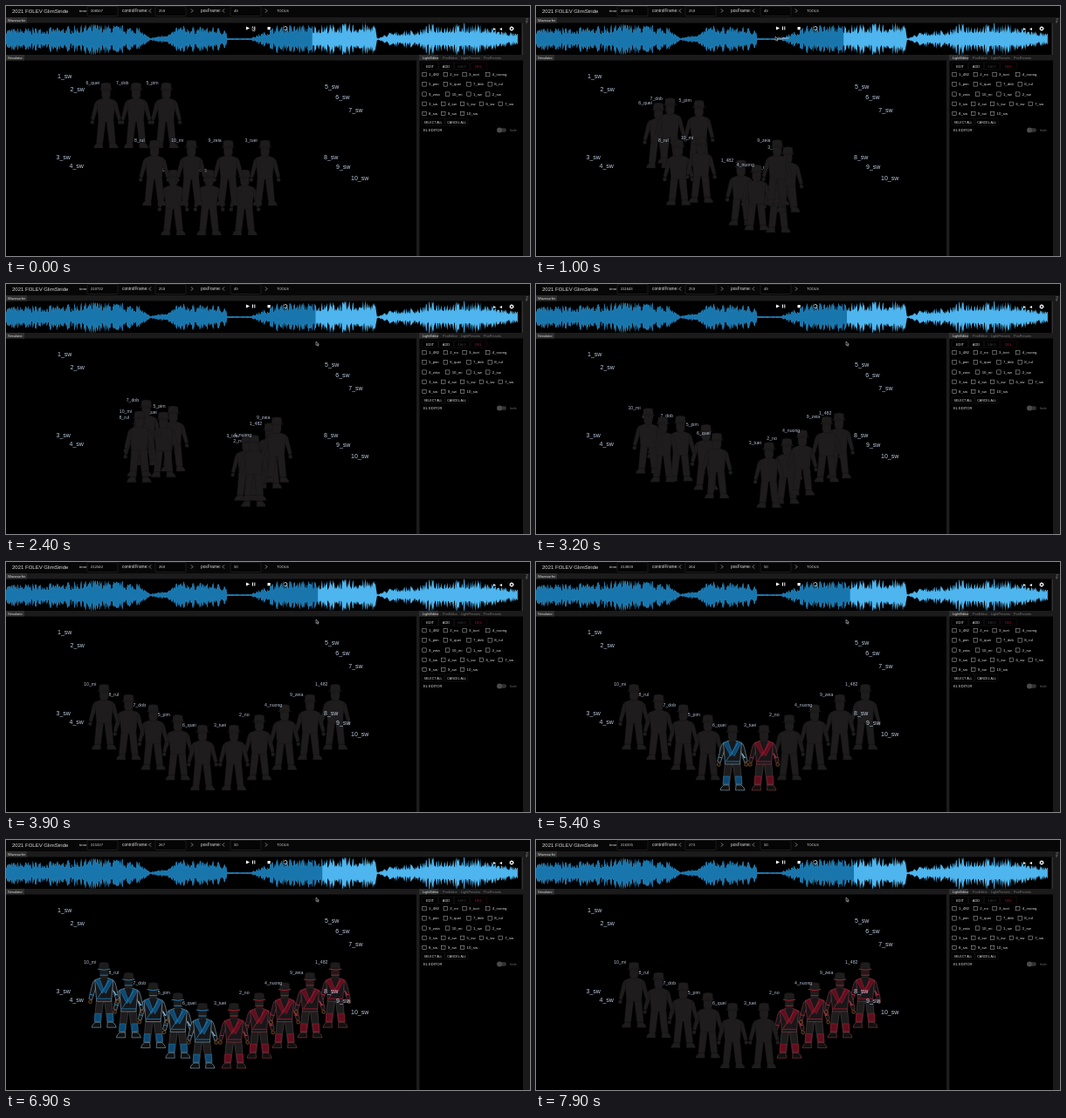
Animation, 600 px wide and 287 px high, one loop 8000 ms. Source, as an HTML page:

```html
<!DOCTYPE html>
<html lang="en">
<head>
<meta charset="utf-8">
<title>Light show editor</title>
<style>
  html, body { margin: 0; width: 100%; height: 100%; overflow: hidden; background: #000; }
  svg { display: block; width: 100%; height: 100%; font-family: "Liberation Sans", Arial, sans-serif; }
  text { white-space: pre; }
  .blue { --c: #1f86c6; --edge: #9fc6da; --dark: #10486f; }
  .red { --c: #ae1d33; --edge: #a5404f; --dark: #5e0f1e; }
</style>
</head>
<body>
<svg id="stage" viewBox="0 0 600 287" preserveAspectRatio="none"></svg>
<script>
const LOOP = 8000, STEP = 100;
const MOVE_START = 208507, MOVE_END = 212250;
const BODY = '#1e1c1c';
const stage = document.getElementById('stage');

const names = ['1_482', '2_no', '3_tuei', '4_nuong', '5_pim', '6_quei', '7_dob', '8_rul', '9_zeia', '10_mi'];
// dancers by number: three starting rows, then one V from left to right
const startRows = [
  { who: [6, 7, 5], x: 114.5, y: 88, gap: 34.5 },
  { who: [8, 10, 9, 3], x: 170, y: 154, gap: 42.2 },
  { who: [1, 4, 2], x: 191.5, y: 188, gap: 41 }
];
const lineUp = [10, 8, 7, 5, 6, 3, 2, 4, 9, 1];

// loop time, show time
const clock = [[0, 208507], [1000, 209379], [2400, 210732], [3200, 211643], [LOOP, 216435]];
const pointer = [[0, 282, 24], [400, 282, 24], [900, 274, 35], [1300, 274, 35], [1900, 355, 66]];

const mix = (a, b, u) => a + (b - a) * u;
const clamp = (v, low, high) => Math.max(low, Math.min(high, v));

function along(points, t) {
  const next = points.findIndex(p => p[0] > t);
  if (next < 0) return points.at(-1).slice(1);
  const a = points[next - 1], b = points[next];
  return a.slice(1).map((v, k) => mix(v, b[k + 1], (t - a[0]) / (b[0] - a[0])));
}

const label = (x, y, text, size = 4.4, fill = '#ddd', extra = '') =>
  `<text x="${x}" y="${y}" font-size="${size}" fill="${fill}" ${extra}>${text}</text>`;
const box = (x, y, w, h, fill, stroke = 'none', r = 0) =>
  `<rect x="${x}" y="${y}" width="${w}" height="${h}" rx="${r}" fill="${fill}" stroke="${stroke}" stroke-width=".5"/>`;
const shape = (d, fill, stroke = 'none', width = .5) =>
  `<path d="${d}" fill="${fill}" stroke="${stroke}" stroke-width="${width}"/>`;
const line = (d, color, width = .6) => shape(d, 'none', color, width);
const both = part => part + `<g transform="scale(-1 1)">${part}</g>`;
const strip = (x, y, w, tab) => box(x, y, w, 6.5, '#1b1b1b') + box(x, y, tab, 6.5, '#303030');

function wavePath() {
  const envelope = [[0, 12], [60, 13], [100, 17], [150, 14], [165, 1], [192, 8], [195, 15], [252, 12], [253, .8],
    [280, 1], [310, 15], [422, 18], [425, 1], [440, 8], [475, 11], [485, 17], [540, 17], [586, 6]];
  let seed = 7;
  const random = () => (seed = seed * 16807 % 2147483647) / 2147483647;
  const top = [], bottom = [];
  for (let x = 0; x <= 586; x += .7) {
    const [level] = along(envelope, Math.min(x, 585.9));
    const spike = level * (.4 + .7 * random() ** 1.6);
    top.push(`${x.toFixed(1)} ${(38 - spike).toFixed(1)}`);
    bottom.unshift(`${x.toFixed(1)} ${(38 + spike * mix(.85, 1.1, random())).toFixed(1)}`);
  }
  return `M${top.join('L')}L${bottom.join('L')}Z`;
}

const outline = {
  hat: 'M-6 8L-5.3 1Q0-1 5.3 1L6 8Z',
  brim: 'M-8 8Q0 6 8 8Q0 10.500 -8 8Z',
  head: 'M-5 8.500H5V15Q4 18 2.500 19H-2.500Q-4 18 -5 15Z',
  torso: 'M-4 18L-10.500 20.500L-8.500 45H8.500L10.500 20.500L4 18Z',
  arm: 'M-9.500 20.500Q-12.500 21 -13.500 26L-17.300 42L-13.800 43.500L-9.500 30Z',
  leg: 'M-8.800 44H-.4L-3.500 69H-11Z',
  foot: 'M-10 69H-4L-3.500 75H-14Q-14 72 -10 69Z'
};

function dimFigure() {
  const part = name => shape(outline[name], BODY, '#171516', .3);
  return both(part('arm') + part('leg') + part('foot') + `<circle cx="-15.700" cy="45.500" r="2.200" fill="${BODY}"/>`) +
    ['torso', 'head', 'hat', 'brim'].map(part).join('');
}

function litFigure() {
  const side = shape(outline.arm, '#151517', 'var(--edge)') +
    shape(outline.leg, BODY, '#626064', .4) +
    shape('M-10.300 59H-3.500L-4 68H-10.800Z', 'var(--dark)', 'var(--c)') +
    shape(outline.foot, '#111', 'var(--edge)') +
    line('M-16 37L-11.500 38', 'var(--c)', 1) +
    '<circle cx="-15.700" cy="45.500" r="1.900" fill="#150f0a" stroke="#a4692d" stroke-width=".6"/>';
  const lapel = shape('M-10 21L-5 19L0 33L-2 36Z', 'var(--dark)', 'var(--c)');
  return both(side) + shape(outline.torso, '#171719', 'var(--edge)') + both(lapel) +
    line('M-8.500 42H8.500M6 21L-7 41', 'var(--c)', .8) + line('M11 33L14 38', 'var(--edge)', 1.1) +
    ['head', 'hat', 'brim'].map(name => shape(outline[name], BODY, '#171516', .3)).join('') +
    `<g class="band">${line('M-7 8Q0 10 7 8M-4.500 15H4.500', 'var(--c)', .9)}</g>`;
}

function topBar() {
  const chevron = (x, dir) => line(`M${x} 3.500L${x + 2 * dir} 5.500L${x} 7.500`, '#ddd');
  const field = (x, id) => box(x, .3, 35, 11.200, '#050505', '#333', 1) + label(x + 4, 7.200, '', 4.200, '#ddd', `id="${id}"`);
  return box(0, 0, 600, 13.500, '#070707') + label(7, 8, '2021 FOLEV GlimStride', 6) +
    label(84, 7.200, 'time:') + field(93, 'time') +
    label(133, 7.200, 'controlFrame:', 4.800) + chevron(166, -1) + field(171, 'control') + chevron(212, 1) +
    label(223, 7.200, 'posFrame:', 4.800) + chevron(250, -1) + field(257, 'position') + chevron(297, 1) +
    label(310, 7.200, 'TOOLS', 4.100);
}

function wavePanel() {
  const wave = wavePath();
  const ring = (x, y, r, dash, width = .7) =>
    `<circle cx="${x}" cy="${y}" r="${r}" fill="none" stroke="#fff" stroke-width="${width}" stroke-dasharray="${dash}"/>`;
  return strip(0, 13, 592, 24) + label(2, 17.500, 'Wavesurfer', 4) + shape(wave, '#4eb5ee') +
    '<clipPath id="playedClip"><rect id="played" y="19" height="38"/></clipPath>' +
    `<g clip-path="url(#playedClip)">${shape(wave, '#1976ad')}</g>` +
    shape('M275 23.500L279 25.500L275 27.500ZM282 23.500h1v4h-1zM284.300 23.500h1v4h-1zM299.500 24h3.200v3.200h-3.200z' +
      'M558 25L561 26.500L558 28ZM568 25L565 26.500L568 28Z', '#fff') +
    ring(320, 25.500, 2, '4.800 1.500') + ring(579, 26, 1.600, 'none', 1.100) + ring(579, 26, 2.400, '1 .880') +
    box(590.500, 19.500, 1.500, 36.500, '#333');
}

function editorPanel() {
  const items = [...names, ...Array.from({ length: 10 }, (_, i) => `${i + 1}_sw`)];
  const checkRow = (from, to, y) => {
    let x = 479;
    return items.slice(from, to).map(name => {
      const cell = box(x - 2.200, y - 2.200, 4.400, 4.400, 'none', '#bbb') + label(x + 5, y + 1.500, name, 4.300);
      x += 12 + 2.450 * name.length;
      return cell;
    }).join('');
  };
  const checks = [0, 4, 8, 12, 17, 20].map((from, row, starts) =>
    row < 5 ? checkRow(from, starts[row + 1], 78.700 + row * 11.200) : '').join('');
  const button = (x, y, w, text, size, color = '#ddd', border = '#1c1c1c') =>
    box(x, y, w, 8, 'none', border, 1) + label(x + w / 2, y + 5.600, text, size, color, 'text-anchor="middle"');
  return box(470, 56, 3.500, 231, '#1c1c1c') + strip(473, 56, 119, 22) +
    label(477, 60.500, 'LightEditor', 3.900) + label(500, 60.500, 'PosEditor', 3.900, '#777') +
    label(521, 60.500, 'LightPresets', 3.900, '#777') + label(547, 60.500, 'PosPresets', 3.900, '#777') +
    button(476, 65, 19, 'EDIT', 4) + button(495, 65, 18, 'ADD', 4) + button(513, 65, 18, 'SAVE', 4, '#333') +
    button(532, 65, 18.500, 'DEL', 4, '#a81430', '#2c0a12') + checks +
    button(476, 129, 26, 'SELECT ALL', 3.600) + button(503, 129, 26, 'CANCEL ALL', 3.600) +
    label(478, 144, 'EL EDITOR', 4.100) + box(563, 140.200, 10, 4.500, '#333', 'none', 2.200) +
    '<circle cx="565" cy="142.400" r="3" fill="#4b4b4b"/>' + label(577, 144, 'hide', 4.200, '#666') +
    box(592, 13, 8, 274, '#1a1a1a') + label(0, 0, 'File', 3.600, '#888', 'transform="translate(595 14) rotate(90)"');
}

function sideLabels() {
  const groups = [
    { first: 1, count: 2, x: 59, y: 83, dx: 14.5, dy: 14.5 },
    { first: 3, count: 2, x: 57.5, y: 176, dx: 15, dy: 10 },
    { first: 5, count: 3, x: 365, y: 95, dx: 12.3, dy: 12.3 },
    { first: 8, count: 3, x: 364, y: 176, dx: 14, dy: 10.8 }
  ];
  return groups.map(g => Array.from({ length: g.count }, (_, k) =>
    label(g.x + g.dx * k ** 1.15, g.y + g.dy * k ** 1.15, `${g.first + k}_sw`, 7, '#bccbe0')).join('')).join('');
}

const dancers = names.map((name, i) => {
  const number = i + 1;
  const row = startRows.find(r => r.who.includes(number));
  const place = lineUp.indexOf(number);
  const left = place < 5;
  const fromCentre = left ? 4 - place : place - 5;
  return {
    name, place, left, fromCentre,
    x0: row.x + row.gap * row.who.indexOf(number), y0: row.y,
    x1: left ? 225 - 28.2 * fromCentre : 261 + 29 * fromCentre, y1: 187 - 11.7 * fromCentre
  };
});

function simulator() {
  return strip(0, 56, 470, 21) + label(2, 60.500, 'Simulator', 4) +
    dancers.map(d => `<g class="dancer ${d.left ? 'blue' : 'red'}"><g>${dimFigure()}</g><g>${litFigure()}</g>` +
      `${label(-23, 2, d.name, 5.200, '#b4bfd2')}</g>`).join('') + sideLabels();
}

stage.innerHTML = box(0, 0, 600, 287, '#000') + topBar() + wavePanel() + simulator() + editorPanel() +
  label(275.500, 38, 'play/pause', 3, '#ddd', 'id="tip"') +
  '<path id="pointer" d="M0 0V4.500L1.100 3.600L1.900 5.300L2.700 4.900L1.900 3.300H3.300Z" fill="#111" stroke="#ddd" stroke-width=".5"/>';

const el = id => document.getElementById(id);
const figures = [...document.querySelectorAll('.dancer')];
const show = (node, on) => node.setAttribute('display', on ? 'inline' : 'none');

// lights build up to cue 267, then a faster run switches them off
function cueAt(time) {
  const build = clamp(Math.floor((time - 212300) / 360), -1, 7);
  const fade = Math.max(0, Math.floor((time - 215300) / 155));
  return 260 + build + fade;
}

// the pair in the centre starts, its neighbours follow, then all go dark from the left
function isLit(dancer, cue) {
  const reach = cue < 262 ? 0 : cue < 265 ? 1 : cue < 267 ? cue - 263 : 5;
  return dancer.fromCentre < reach && dancer.place >= cue - 267;
}

function draw() {
  const t = Math.floor(performance.now() % LOOP / STEP) * STEP;
  const [time] = along(clock, t);
  const cue = cueAt(time);
  const u = clamp((time - MOVE_START) / (MOVE_END - MOVE_START), 0, 1);

  el('time').textContent = Math.round(time);
  el('control').textContent = cue;
  el('position').textContent = u < 1 ? 49 : 50;
  el('played').setAttribute('width', time * .001682);

  figures.forEach((figure, i) => {
    const d = dancers[i];
    const [dim, lit] = figure.children;
    const on = isLit(d, cue);
    figure.setAttribute('transform', `translate(${mix(d.x0, d.x1, u)} ${mix(d.y0, d.y1, u)})`);
    show(dim, !on);
    show(lit, on);
    show(lit.querySelector('.band'), on && cue > 264);
  });

  const [px, py] = along(pointer, t);
  el('pointer').setAttribute('transform', `translate(${px} ${py})`);
  show(el('tip'), t >= 800 && t < 1400);
  requestAnimationFrame(draw);
}
draw();
</script>
</body>
</html>
```
